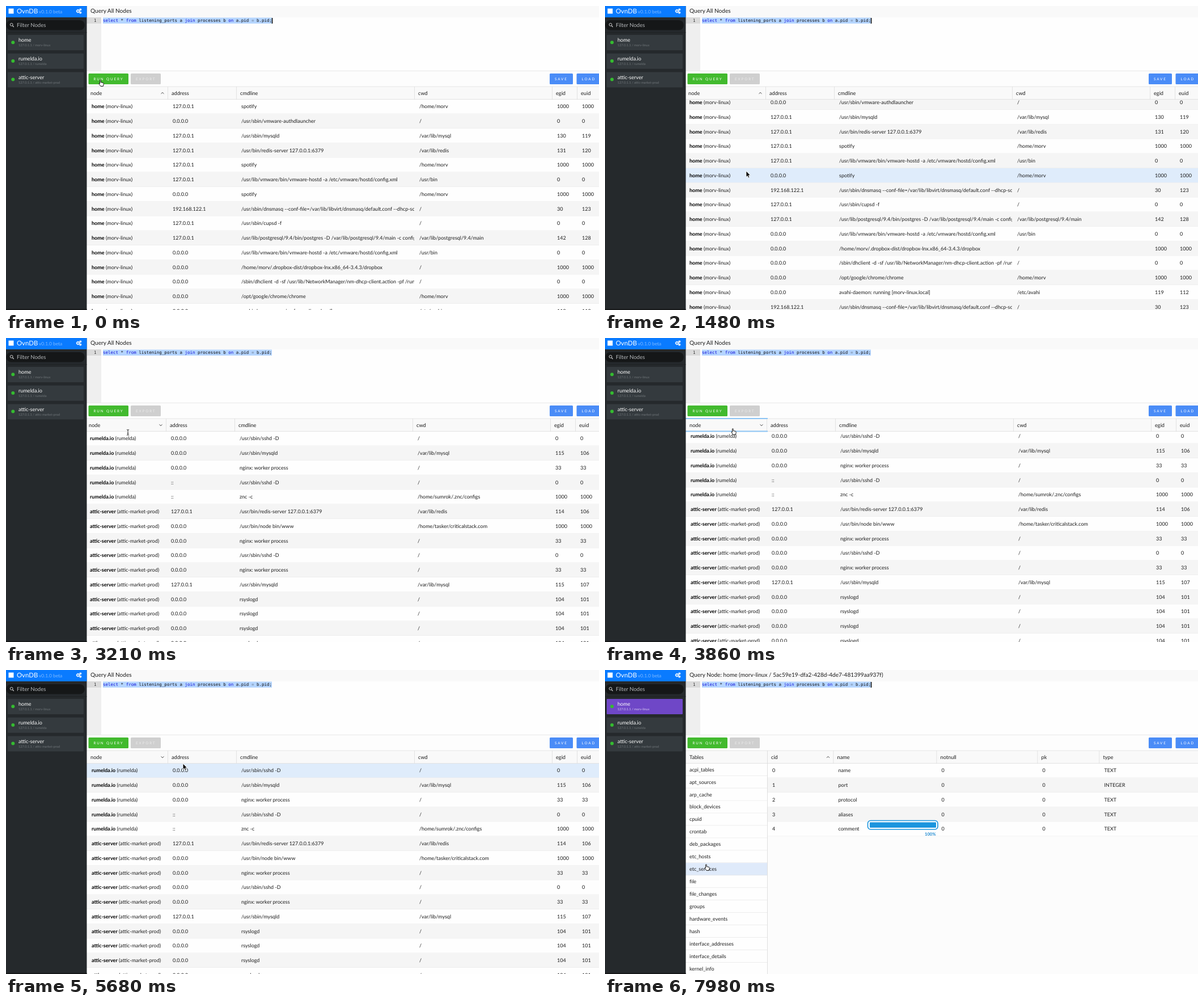
Write an HTML page that moves like this. It is 1046x536 px and loops after 8000 ms.

```html
<!DOCTYPE html>
<html lang="en">
<head>
<meta charset="utf-8">
<title>Node query console</title>
<style>
html, body { margin: 0; width: 100%; height: 100%; overflow: hidden; background: #fcfcfc; }
svg { display: block; }
text { font-family: Lato, sans-serif; text-rendering: geometricPrecision; white-space: pre; }
.code { font-family: "DejaVu Sans Mono", monospace; }
</style>
</head>
<body>
<svg id="stage" width="1046" height="536"></svg>
<script>
const LOOP = 8000, ROW = 25.75, TOP = 164.5, ITEM = 21.95;
const stage = document.getElementById('stage');

const moments = [[0], [180], [600, 1480, 6], [1720], [2020, 2610, 4], [2880, 3860, 6], [4040],
  [4340, 4820, 3], [5290, 5910, 4], [6270, 6420, 2], [6710], [6980, 7980, 7]]
  .flatMap(([a, b = a, n = 1]) =>
    Array.from({ length: n }, (_, i) => Math.round(a + (b - a) * i / Math.max(1, n - 1))));

// Pointer and scroll path: time, x, y, pointer shape, scroll x, scroll y
const path = [
  [0, 164, 130, 'hand', 0, 0],
  [590, 164, 130, 'hand', 0, 0],
  [600, 185, 165, 'arrow', 0, 0],
  [960, 235, 270, 'arrow', 0, 0],
  [1480, 249, 291, 'arrow', 2, 33],
  [1720, 249, 285, 'arrow', 5, 24],
  [2020, 240, 230, 'arrow', 9.5, 0],
  [2217, 222, 152, 'hand', 9.5, 0],
  [2610, 201, 169, 'beam', 9.5, 0],
  [2880, 206, 168, 'beam', 6, 0],
  [3270, 224, 155, 'hand', 0, 0],
  [3860, 223, 159, 'hand', 0, 4],
  [4040, 250, 172, 'arrow', 0, 0],
  [4820, 492, 236, 'arrow', 0, 0],
  [5200, 492, 236, 'arrow', 0, 0],
  [5910, 62, 66, 'hand', 0, 0],
  [6700, 62, 66, 'hand', 0, 0],
  [6710, 305, 204, 'arrow', 0, 0],
  [6900, 305, 204, 'arrow', 0, 0],
  [7480, 176, 342, 'hand', 0, 0],
  [LOOP, 176, 342, 'hand', 0, 0]
];

const hosts = [['home', 'morv-linux'], ['rumelda.io', 'rumelda'], ['attic-server', 'attic-market-prod']];
const lines = (host, text) => text.trim().split('\n').map(line => [hosts[host], ...line.trim().split('|')]);
const dnsmasq = '192.168.122.1|/usr/sbin/dnsmasq --conf-file=/var/lib/libvirt/dnsmasq/default.conf --dhcp-script|/|30|123';
const vmware = '/usr/lib/vmware/bin/vmware-hostd -a /etc/vmware/hostd/config.xml|/usr/bin|0|0';
const ascending = lines(0, `
  127.0.0.1|spotify|/home/morv|1000|1000
  0.0.0.0|/usr/sbin/vmware-authdlauncher|/|0|0
  127.0.0.1|/usr/sbin/mysqld|/var/lib/mysql|130|119
  127.0.0.1|/usr/bin/redis-server 127.0.0.1:6379|/var/lib/redis|131|120
  127.0.0.1|spotify|/home/morv|1000|1000
  127.0.0.1|${vmware}
  0.0.0.0|spotify|/home/morv|1000|1000
  ${dnsmasq}
  127.0.0.1|/usr/sbin/cupsd -f|/|0|0
  127.0.0.1|/usr/lib/postgresql/9.4/bin/postgres -D /var/lib/postgresql/9.4/main -c config_file|/var/lib/postgresql/9.4/main|142|128
  0.0.0.0|${vmware}
  0.0.0.0|/home/morv/.dropbox-dist/dropbox-lnx.x86_64-3.4.3/dropbox|/|1000|1000
  0.0.0.0|/sbin/dhclient -d -sf /usr/lib/NetworkManager/nm-dhcp-client.action -pf /run/sendsigs|/|0|0
  0.0.0.0|/opt/google/chrome/chrome|/home/morv|1000|1000
  0.0.0.0|avahi-daemon: running [morv-linux.local]|/etc/avahi|119|112
  ${dnsmasq}`);
const descending = [...lines(1, `
  0.0.0.0|/usr/sbin/sshd -D|/|0|0
  0.0.0.0|/usr/sbin/mysqld|/var/lib/mysql|115|106
  0.0.0.0|nginx: worker process|/|33|33
  ::|/usr/sbin/sshd -D|/|0|0
  ::|znc -c|/home/sumrok/.znc/configs|1000|1000`), ...lines(2, `
  127.0.0.1|/usr/bin/redis-server 127.0.0.1:6379|/var/lib/redis|114|106
  0.0.0.0|/usr/bin/node bin/www|/home/tasker/criticalstack.com|1000|1000
  0.0.0.0|nginx: worker process|/|33|33
  0.0.0.0|/usr/sbin/sshd -D|/|0|0
  0.0.0.0|nginx: worker process|/|33|33
  127.0.0.1|/usr/sbin/mysqld|/var/lib/mysql|115|107
  ${'0.0.0.0|rsyslogd|/|104|101\n'.repeat(5)}`)];
const fields = list => list.split(' ').map((name, i) =>
  [i, name, 0, 0, /size|port/.test(name) ? 'INTEGER' : 'TEXT']);
const tables = ('acpi_tables apt_sources arp_cache block_devices cpuid crontab deb_packages etc_hosts etc_services ' +
  'file file_changes groups hardware_events hash interface_addresses interface_details kernel_info').split(' ');

const processHead = ['node', 'address', 'cmdline', 'cwd', 'egid', 'euid'];
const processEdges = [142, 285, 406, 720, 963, 1007, 1050];
const fieldHead = ['cid', 'name', 'notnull', 'pk', 'type'];

const rect = (x, y, w, h, fill, extra = '') =>
  `<rect x="${x}" y="${y}" width="${w}" height="${h}" fill="${fill}" ${extra}/>`;
const text = (x, y, s, size = 9, fill = '#1c1c1c', extra = '') =>
  `<text x="${x}" y="${y}" font-size="${size}" fill="${fill}" ${extra}>${s}</text>`;
const line = (d, stroke, width = 1) =>
  `<path d="${d}" fill="none" stroke="${stroke}" stroke-width="${width}"/>`;
const button = (x, w, label, fill, ink = '#fff') =>
  rect(x, 119, w, 19, fill, 'rx="1.5"') + text(x + 9, 131.2, label, 6.3, ink, 'letter-spacing="1.9"');

function grid(head, edges, data, { sx = 0, sy = 0, hover = -1, down = false }) {
  let body = '';
  data.forEach((row, r) => {
    const y = TOP + r * ROW - sy;
    body += rect(edges[0] - 20, y, 960, ROW, r === hover ? '#dfecfb' : r % 2 ? '#f5f5f5' : '#fefefe');
    body += rect(edges[0] - 20, y + ROW - .6, 960, .6, '#e9e9e9');
    row.forEach((cell, c) => {
      const label = Array.isArray(cell) ? `<tspan font-weight="bold" fill="#000">${cell[0]}</tspan> (${cell[1]})` : cell;
      const width = (edges[c + 1] || 1060) - edges[c];
      body += `<svg x="${edges[c] - sx}" y="${y}" width="${width}" height="${ROW}">${text(9, 15.8, label)}</svg>`;
    });
  });
  body += rect(edges[0], 142, 910, 23, '#f9f9f9') + rect(edges[0], 164.3, 910, .8, '#dcdcdc');
  head.forEach((name, i) => body += text(edges[i] + 7 - sx, 156.6, name, 9.2));
  edges.slice(1).forEach(x => body += rect(x - sx, 142, .8, 23, '#dcdcdc'));
  const x = edges[1] - 9 - sx, d = down ? 1.2 : -1.2;
  return body + line(`M${x - 2.5} ${153.6 - d}L${x} ${153.6 + d}L${x + 2.5} ${153.6 - d}`, '#333', .9);
}

function tableList(selected) {
  let out = rect(142, 142, 144.5, 394, '#fefefe');
  tables.forEach((name, i) => {
    const y = 164.6 + i * ITEM;
    if (i === selected) out += rect(142, y, 144, ITEM, '#dfeafa');
    out += rect(142, y + ITEM - .7, 144, .7, '#e6e6e6') + text(149, y + 14, name);
  });
  return out + rect(142, 142, 144, 23, '#f9f9f9') + rect(142, 164.3, 144, .8, '#dcdcdc') +
    text(149, 156.6, 'Tables', 9.2) + rect(286, 142, .8, 394, '#d8d8d8');
}

function editor(title, caret) {
  const sql = 'select * from listening_ports a join processes b on a.pid = b.pid;'
    .replace(/\b(select|from|join|on)\b|=/g, (word, key) =>
      `<tspan fill="${key ? '#1212d8' : '#687687'}">${word}</tspan>`);
  return rect(142, 0, 904, 20, '#f9f9f9') + text(149, 12.4, title, 10.1) +
    rect(142, 20, 904, 94, '#fefefe') + rect(142, 20, 26, 94, '#efefef') + rect(142, 20, 26, 11, '#dadada') +
    rect(171, 20.5, 298, 10.5, '#b5d5ff') +
    text(155, 28.4, '1', 7.5, '#333', 'class="code"') + text(171, 28.4, sql, 7.5, '#111', 'class="code"') +
    (caret ? rect(468.8, 21, 1.5, 10, '#000') : '') +
    rect(142, 114, 904, 28, '#fdfdfd') + rect(142, 114, 904, .8, '#e4e4e4') + rect(142, 141.7, 904, .8, '#e0e0e0') +
    button(145.5, 70.5, 'RUN QUERY', '#42ba2e') + button(220, 53, 'EXPORT', '#cfcfcf', '#ececec') +
    button(959, 41, 'SAVE', '#4a8cf7') + button(1006.5, 44, 'LOAD', '#4a8cf7');
}

function gear(x, y, r) {
  return `<circle cx="${x}" cy="${y}" r="${r}" fill="none" stroke="#fff" stroke-width="1.5"/>` +
    `<circle cx="${x}" cy="${y}" r="${r + 1}" fill="none" stroke="#fff" stroke-width="1" stroke-dasharray="1 1.2"/>`;
}

function sidebar(active) {
  let out = rect(0, 0, 142.5, 536, '#25292c') + rect(0, 534, 142.5, 2, '#17191a') +
    rect(0, 0, 142.5, 20, '#0a7bff') + rect(4.5, 4.5, 9, 9, '#fff') +
    text(19, 13, 'OvnDB', 11.4, '#fff') + text(58, 12.8, 'v0.1.0 beta', 8.4, '#7fb9ff') +
    gear(127, 9, 2) + gear(131.3, 6.3, .9) + gear(131.3, 11.7, .9) +
    rect(.5, 25, 138.5, 17.5, '#151718', 'rx="8.7"') +
    '<circle cx="9.7" cy="32.8" r="2.4" fill="none" stroke="#ccc"/>' + line('M11.5 34.6L13.8 37', '#ccc', 1.3) +
    text(19, 37, 'Filter Nodes', 9.6, '#b4b7b9') + rect(0, 46.5, 142.5, .7, '#1c1f21');
  hosts.forEach(([name, machine], i) => {
    const y = 51 + i * 32.7, on = active && !i;
    out += rect(3, y, 134, 27, on ? '#6f47c7' : '#343a3e', 'rx="1"') +
      `<circle cx="12.3" cy="${y + 13.2}" r="3" fill="#35bb30"/>` +
      text(22, y + 12.2, name, 9.1, '#fff') +
      text(22, y + 20.3, `127.0.1.1 / ${machine}`, 5.7, on ? '#d9cdf2' : '#70767a');
  });
  return out;
}

function progress(percent) {
  return rect(463.5, 265.5, 123.5, 15.5, '#fff', 'rx="5" stroke="#1592dd" stroke-width="1.6"') +
    rect(467, 268.5, 117 * percent / 100, 9.5, '#1b95de', 'rx="1"') +
    text(583.5, 292, percent + '%', 7.6, '#1b88d0', 'font-weight="bold" text-anchor="end"');
}

const pointers = {
  arrow: '<path d="M0 0V10.5L2.4 8.4 4 12 5.8 11.2 4.3 7.7H7.4Z" stroke="#fff" stroke-width=".8"/>',
  hand: '<path d="M1.6 7V1.2Q2.4 0 3.2 1.2V4.6L7.4 5.5Q8.4 5.9 8.2 7.5L7.4 11.5H3L.2 7.6Q-.4 6.4 .8 6.5Z" fill="#fff" stroke="#000" stroke-width=".9"/>',
  beam: '<path d="M-2 0Q0 0 0 1.5Q0 0 2 0M0 1V9M-2 10Q0 10 0 8.5Q0 10 2 10M-1.3 6.5H1.3" fill="none" stroke="#222" stroke-width=".9"/>'
};

function poseAt(t) {
  const i = path.findLastIndex(key => key[0] <= t);
  const a = path[i], b = path[i + 1] || a, f = b === a ? 0 : (t - a[0]) / (b[0] - a[0]);
  const mix = k => a[k] + (b[k] - a[k]) * f;
  return { x: mix(1), y: mix(2), kind: a[3], sx: mix(4), sy: mix(5) };
}

function scene(t) {
  const { x, y, kind, sx, sy } = poseAt(t);
  const onNode = t >= 6270, down = t >= 2217, focused = t >= 3270 && t < 4040;
  const caret = t < 180 || (t >= 600 && t < 2020) || (onNode && !(t > 7100 && t < 7600));
  let out = rect(0, 0, 1046, 536, '#fcfcfc');
  if (onNode) {
    if (t >= 7800) out += grid(fieldHead, [286, 402.5, 584.5, 762.5, 871.5], fields('name port protocol aliases comment'), {});
    else if (t >= 6420) out += grid(fieldHead, [286, 407, 568, 753, 865], fields('name size md5'), {});
    out += tableList(t < 7470 ? 0 : 8);
  } else {
    const hover = kind === 'arrow' && x > 142 && y > TOP ? Math.floor((y + sy - TOP) / ROW) : -1;
    out += grid(processHead, processEdges, down ? descending : ascending, { sx, sy, hover, down });
  }
  const title = onNode ? 'Query Node: home (morv-linux / 5ac59e19-dfa2-428d-4de7-481399aa937f)' : 'Query All Nodes';
  out += editor(title, caret);
  if (focused) out += line('M142 142H287M142 164.5H287', '#8cc4f4', 2.2);
  out += sidebar(onNode);
  if (t >= 7600) out += progress(Math.min(100, Math.round((t - 7480) / 5)));
  return out + `<g transform="translate(${x} ${y})">${pointers[kind]}</g>`;
}

let shown = -1;
function tick() {
  const now = performance.now() % LOOP;
  const t = moments.findLast(m => m <= now);
  if (t !== shown) stage.innerHTML = scene(shown = t);
  requestAnimationFrame(tick);
}
tick();
</script>
</body>
</html>
```
